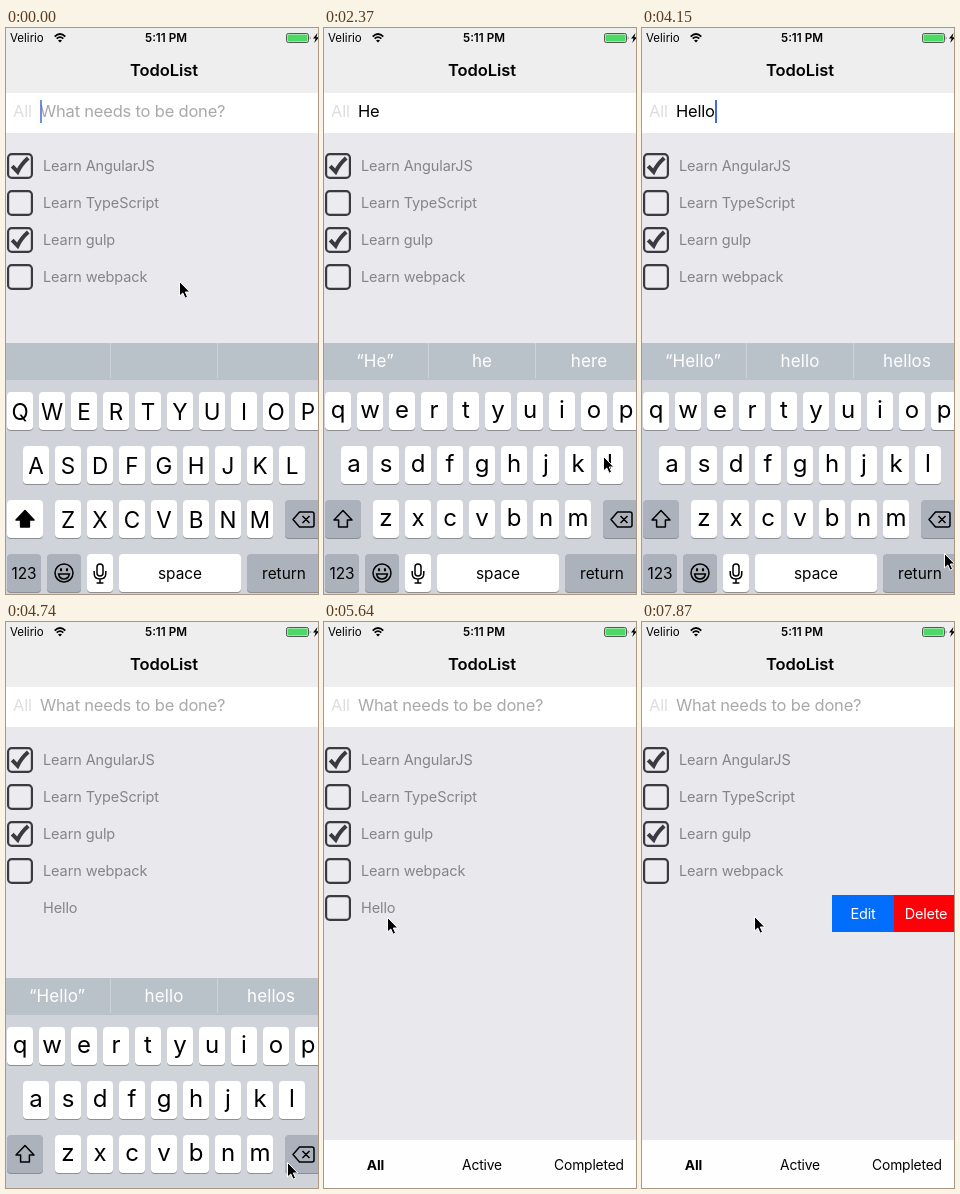
Recreate the animation shown at these times as an HTML page. Size 312 by 566 pixels, loop 8 s.

```html
<!DOCTYPE html>
<html lang="en">
<head>
<meta charset="utf-8">
<title>TodoList</title>
<style>
html, body { margin: 0; width: 100%; height: 100%; overflow: hidden; }
#stage {
  position: relative; width: 312px; height: 566px; overflow: hidden;
  background: #e9e8ed; color: #000; font-family: Inter, Roboto, sans-serif; white-space: pre;
}
#stage div, #stage svg { position: absolute; box-sizing: border-box; }
#stage svg { overflow: visible; }
.mid { display: flex; align-items: center; justify-content: center; }

#head { left: 0; top: 0; width: 312px; height: 65px; background: #efeeef; }
#net { left: 4px; top: 1px; height: 18px; font-size: 11.5px; }
#clock { left: 110px; top: 1px; width: 100px; height: 18px; font-size: 11.7px; font-weight: 600; }
#title { left: 58px; top: 30px; width: 200px; height: 24px; font-size: 16.5px; font-weight: 600; letter-spacing: -.05px; }

#field { left: 0; top: 65px; width: 312px; height: 40px; background: #fff; font-size: 16.5px; letter-spacing: -.2px; }
#field > div { top: 7px; height: 23px; line-height: 23px; }
#toggle { left: 7px; color: #dedee0; }
#hint { left: 34px; color: #a9a9ac; }
#entry { left: 34px; }
#caret { display: inline-block; width: 2px; height: 23px; vertical-align: top; background: #4168dc; }

#list { left: 0; top: 0; }
.row { left: 0; width: 312px; height: 37px; background: #e9e8ed; }
.row svg { left: 1px; top: 0; }
.row .name { left: 37px; top: 0; height: 26px; line-height: 26px; font-size: 14.5px; letter-spacing: -.1px; color: #858489; }
.act { top: 273px; height: 37px; color: #fff; font-size: 14.5px; letter-spacing: -.25px; }

#tabs { left: 0; top: 518px; width: 312px; height: 48px; background: #fefefe; font-size: 13.8px; letter-spacing: -.15px; }
#tabs div { top: 14px; width: 107px; height: 22px; }

#kb { left: 0; top: 315px; width: 312px; height: 251px; background: #d0d3da; }
#bar { left: 0; top: 0; width: 312px; height: 37px; background: #b9c1c9; }
.word { top: 0; width: 107px; height: 35px; color: #fff; font-size: 17px; letter-spacing: .1px; border-left: 1px solid #cdd3d9; }
.key { height: 38px; border-radius: 4px; background: #fff; box-shadow: 0 1px 0 #8b8e93; font-size: 15.4px; }
.grey { background: #abb2bc; }
.letter { width: 26px; font-size: 24px; padding-bottom: 4px; }
.caps .letter { font-size: 22.5px; padding-bottom: 0; text-transform: uppercase; }
#shift { fill: none; }
.caps #shift { fill: #000; }
.caps .shift { background: #fff; }
</style>
</head>
<body>
<div id="stage">
  <div id="head">
    <div id="net" class="mid">Velirio</div>
    <svg style="left:48px;top:5px" width="12" height="10" fill="none" stroke="#000" stroke-width="1.8">
      <path d="M.7 3.6Q6-1.6 11.3 3.6M2.7 5.7Q6 2.6 9.3 5.7"/>
      <path d="M6 9.6L4 7.5Q6 6 8 7.5Z" fill="#000" stroke="none"/>
    </svg>
    <div id="clock" class="mid">5:11 PM</div>
    <svg style="left:280px;top:5px" width="32" height="10">
      <rect x=".5" y=".5" width="22" height="9" rx="1.8" fill="#efeeef" stroke="#555"/>
      <rect x="1.5" y="1.5" width="20" height="7" rx=".8" fill="#4cd964"/>
      <path d="M23.8 3.2Q25.4 5 23.8 6.8Z" fill="#555"/>
      <path d="M31.5 0L27 5.6H29.6L28.2 10 33 4.2H30.4Z"/>
    </svg>
    <div id="title" class="mid">TodoList</div>
  </div>
  <div id="field">
    <div id="toggle">All</div>
    <div id="hint">What needs to be done?</div>
    <div id="entry"><span id="typed"></span><span id="caret"></span></div>
  </div>
  <div class="act mid" style="left:189.5px;width:63px;background:#006dfc">Edit</div>
  <div class="act mid" style="left:252px;width:64px;background:#fd0008">Delete</div>
  <div id="list"></div>
  <div id="tabs">
    <div class="mid" style="left:-2px;font-weight:700">All</div>
    <div class="mid" style="left:104.5px">Active</div>
    <div class="mid" style="left:211.5px">Completed</div>
  </div>
  <div id="kb"><div id="bar"></div></div>
  <svg id="mouse" style="left:0;top:0" width="12" height="18">
    <path d="M.5 .5V15L3.8 12 6.1 17.2 8.6 16.1 6.3 11H10.8Z" stroke="#fff" stroke-linejoin="round"/>
  </svg>
</div>
<script>
const LOOP = 8000, STEPS = 54;
const $ = id => document.getElementById(id);

function add(parent, cls, css, html) {
  const el = document.createElement("div");
  el.className = cls;
  el.style.cssText = css;
  el.innerHTML = html;
  parent.append(el);
  return el;
}

// To-do rows
const box = `<svg width="26" height="26" fill="none" stroke="#3b3a40">
  <rect x="1.1" y="1.1" width="23.8" height="23.8" rx="3.6" stroke-width="2.2" fill="#ecebf0"/>
  <path class="tick" d="M5.2 13.2L10.6 18.8Q14 11.4 21.2 5" stroke-width="4"/></svg>`;
const rows = ["Learn AngularJS", "Learn TypeScript", "Learn gulp", "Learn webpack", "Hello"].map((name, i) => {
  const row = add($("list"), "row", `top:${125 + 37 * i}px`, `${box}<div class="name">${name}</div>`);
  row.querySelector(".tick").style.display = i === 0 || i === 2 ? "" : "none";
  return row;
});
const newRow = rows[4], newBox = newRow.querySelector("svg"), newTick = newRow.querySelector(".tick");

// Keyboard
const kb = $("kb");
const words = [0, 1, 2].map(i => add($("bar"), "word mid", `left:${107 * i - 3}px`, ""));
const key = (cls, x, row, html, w) =>
  add(kb, "key mid " + cls, `left:${x}px;top:${49 + 54 * row}px;${w ? `width:${w}px` : ""}`, html);
const icon = (w, h, body) =>
  `<svg style="position:static" width="${w}" height="${h}" fill="none" stroke="#000" stroke-width="1.5">${body}</svg>`;

["qwertyuiop", "asdfghjkl", "zxcvbnm"].forEach((line, r) =>
  [...line].forEach((c, i) => key("letter", [1, 17, 49][r] + 32 * i, r, c)));
key("grey shift", 1, 2, icon(22, 20,
  `<path id="shift" stroke-linejoin="round" d="M11 1.5L20 11H15.4V18H6.6V11H2Z"/>`), 36);
key("grey", 279, 2, icon(23, 17,
  `<path stroke-linejoin="round" d="M7.5 1H20Q22 1 22 3V14Q22 16 20 16H7.5L1 8.5ZM10.5 5L17.5 12M17.5 5L10.5 12"/>`), 36);
key("grey", 1, 3, "123", 34);
key("grey", 41, 3, icon(20, 20,
  `<circle cx="10" cy="10" r="9"/><path d="M4.6 11H15.4Q14.5 16 10 16T4.6 11Z"/>
   <g fill="#000" stroke="none"><ellipse cx="7" cy="6.7" rx="1.2" ry="1.7"/><ellipse cx="13" cy="6.7" rx="1.2" ry="1.7"/></g>`), 34);
key("", 81, 3, icon(14, 21,
  `<rect x="4" y="1" width="6" height="12" rx="3"/><path d="M1.2 8V10.5Q1.2 16 7 16T12.8 10.5V8M7 16V20M3.6 20H10.4"/>`), 26);
key("", 113, 3, "space", 122);
key("grey", 241, 3, "return", 74);

// Pointer path: step, x, y
const path = [
  [0, 173, 253], [1, 175, 278], [4, 187, 434], [6, 187, 434], [7, 109, 397], [8, 80, 388],
  [11, 80, 388], [13, 165, 405], [15, 270, 425], [16, 279, 428], [17, 283, 434], [20, 283, 434],
  [22, 270, 388], [25, 268, 386], [28, 302, 525], [30, 297, 536], [32, 281, 540], [33, 279, 530],
  [34, 262, 472], [35, 229, 402], [36, 163, 342], [37, 104, 316], [38, 63, 295], [39, 63, 295],
  [41, 13, 284], [43, 13, 284], [46, 300, 256], [48, 275, 286], [49, 270, 290], [53, 112, 294]
];
const typing = [[0, ""], [6, "H"], [10, "He"], [18, "Hel"], [20, "Hell"], [24, "Hello"], [32, ""]];
const guesses = [
  [0, ""], [7, "“H” have he"], [11, "“He” he here"], [18, "“Hel” hello help"],
  [20, "“Hell” hello hell"], [25, "“Hello” hello hellos"]
];
const blinks = [[0, .75], [2, 0], [6, 1], [14, 0], [17, 1], [25, 0], [27, 1], [32, 0]];
const drops = [[0, 0], [32, 41], [33, 190], [34, 255]];

const at = (list, k) => list.filter(e => e[0] <= k).pop()[1];

function pointer(k) {
  const i = Math.max(1, path.findIndex(p => p[0] >= k));
  const [k0, x0, y0] = path[i - 1], [k1, x1, y1] = path[i];
  const f = (k - k0) / (k1 - k0);
  return [x0 + (x1 - x0) * f, y0 + (y1 - y0) * f];
}

function render(k) {
  const [x, y] = pointer(k);
  $("mouse").style.transform = `translate(${Math.round(x)}px,${Math.round(y)}px)`;

  const text = at(typing, k);
  $("typed").textContent = text;
  $("hint").style.display = text ? "none" : "";
  $("caret").style.opacity = at(blinks, k);

  const guess = at(guesses, k).split(" ");
  words.forEach((w, i) => {
    w.textContent = guess[i] || "";
    w.style.color = k === 7 ? "rgba(255,255,255,.35)" : "";
  });
  kb.className = k < 7 ? "caps" : "";
  kb.style.transform = `translateY(${at(drops, k)}px)`;

  // The last row follows the drag until both buttons show
  const slide = k < 49 ? 0 : Math.max(-122.5, Math.min(0, x - 270));
  newRow.style.transform = `translateX(${slide}px)`;
  newRow.querySelector(".name").style.display = k < 32 ? "none" : "";
  newBox.style.display = k < 33 ? "none" : "";
  newTick.style.display = k < 42 ? "none" : "";
}

let last = -1;
function tick() {
  const t = performance.now() % LOOP;
  const k = Math.min(STEPS - 1, Math.floor((t + 4) * STEPS / LOOP));
  if (k !== last) render(last = k);
  requestAnimationFrame(tick);
}
tick();
</script>
</body>
</html>
```
